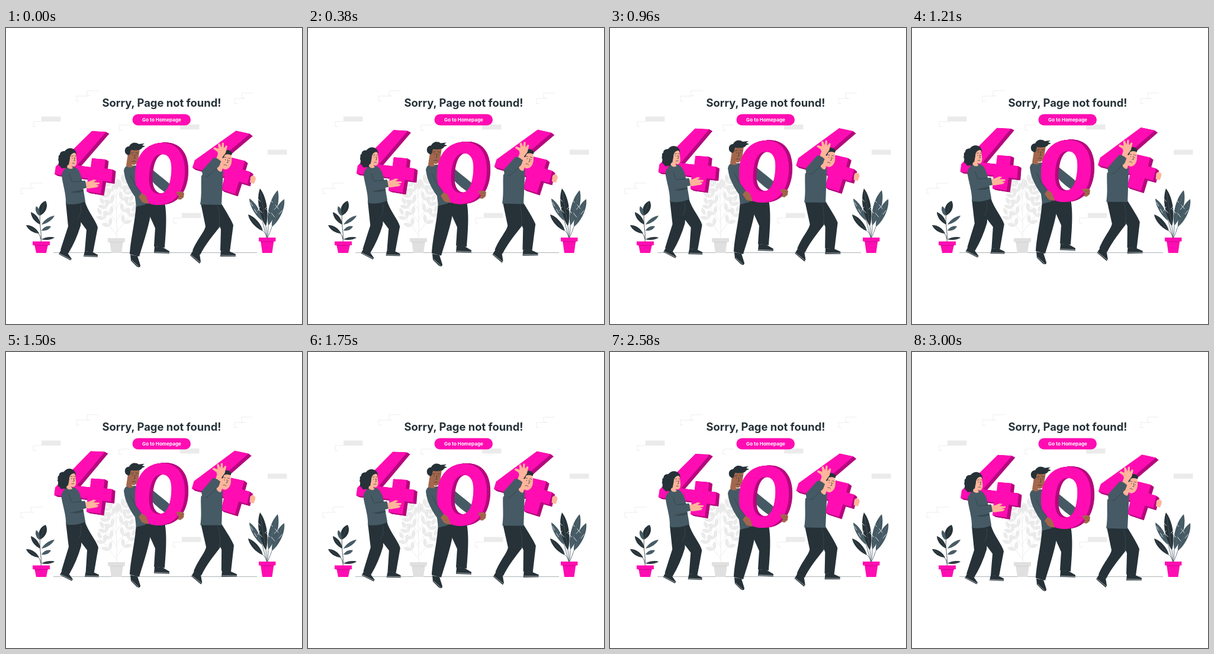
An HTML page that plays this animation: 500x500 px, repeating every 3040 ms.

```html
<!DOCTYPE html>
<html lang="en">
<head>
<meta charset="utf-8">
<title>Page not found</title>
<style>
html, body { margin: 0; width: 100%; height: 100%; overflow: hidden; background: #fff; }
svg { display: block; width: 100%; height: 100%; }
text { font-family: Inter, "Open Sans", sans-serif; font-weight: 700; text-anchor: middle; }
.pink { fill: #ff0db2; }
.side { fill: #b5087e; }
.dark { fill: #263238; }
.grey { fill: #455a64; }
.fold { fill: #37474f; }
.skin { fill: #ffb59b; }
.brown { fill: #a3674c; }
.line { fill: none; stroke: #263238; stroke-width: .7; stroke-linecap: round; }
.seam { fill: none; stroke: #52616a; stroke-width: .4; }
.sole { fill: none; stroke: #fff; stroke-width: .6; }
.brick { fill: #ebebeb; }
.outline { fill: none; stroke: #e6e6e6; stroke-width: .7; }
</style>
</head>
<body>
<svg viewBox="0 0 500 500">
  <defs>
    <path id="four" d="M145 174 169 175.500 120 232 143 235 145 220 168 222 166 237 180 239 178 260 163.500 258 160 280 136 276 138 254 82 247 84 234Z"/>
    <path id="zero" fill-rule="evenodd" d="M264 194C291 194 304 216 302 247C300 280 282 299 257 299C229 299 217 277 218 246C219 214 238 194 264 194ZM263 213C250 213 244 226 242 247C240 268 246 280 258 280C271 280 277 267 279 246C281 225 276 213 263 213Z"/>
    <g id="four3d"></g>
    <g id="zero3d"></g>
  </defs>

  <rect width="500" height="500" fill="#fff"/>
  <g id="bricks"></g>
  <path d="M80 379.500H424" stroke="#8b9398" stroke-width=".7"/>

  <text x="263" y="132.500" font-size="18.400" class="dark">Sorry, Page not found!</text>
  <rect x="213.500" y="145.500" width="98.500" height="19" rx="9.500" class="pink"/>
  <text x="263" y="157.700" font-size="8.100" fill="#fff">Go to Homepage</text>

  <g id="palePlant"></g>
  <g id="leftPlant"></g>
  <g id="rightPlant"></g>

  <g id="woman">
    <path class="skin" d="M165 233C168 229 173 230 173 234L172 239 165 238Z"/>
    <use href="#four3d"/>
    <path class="dark" d="M89 382 93 375 104 380 111 390 109 392.500ZM133 377 145 378 155 383 155 387 131 386Z"/>
    <path class="sole" d="M90 381 110 391M132 384.500 155 385.500"/>
    <path class="dark" d="M101 295 129 295 126 334Q118 360 105 381L92 375Q100 350 105 335Z"/>
    <path class="dark" d="M112 297 133 292C138 310 152 325 155 337L147 379 133 377 136 341 119 318Z"/>
    <path class="seam" d="M126 298C128 310 125 318 121 322"/>
    <path class="grey" d="M105 234 117 235C125 240 128 252 129 262L134 293Q118 300 101 297C102 280 95 262 94 248Q96 239 105 234Z"/>
    <path class="fold" d="M108 277 131 273 131 276Q118 280 108 277Z"/>
    <path class="skin" d="M131 261 141 259 148 256 153 257 148 260.500 158 261 158 263.500 152 264.500 157 266 154 269 140 271 131 270Z"/>
    <path class="grey" d="M95 246C102 238 107 248 110 260L134 258 136 270 110 277C102 276 96 258 95 246Z"/>
    <path class="line" style="stroke-width:.5" d="M107 247C111 256 110 260 113 260L133 258"/>
    <path class="dark" d="M99 208C106 199 118 203 119 212L117 232C112 233 110 237 104 235C101 239 99 235 96 237C92 238 93 233 90 233C87 229 91 226 88 223C90 219 87 216 91 214C91 209 95 208 99 208Z"/>
    <path class="skin" d="M107 210C112 206 118 210 118.500 215L119.500 226C119 234 115 235 111 233L113 237Q107 240 103 235L105 228Z"/>
    <path class="dark" d="M101 207C107 202 117 204 118 211C112 210 108 215 108 221L106 231 100 233Z"/>
    <path class="line" d="M110.500 216.500 113.500 216M116 216 118 216.500M112 219.500V220.500M117 219.500V220.500M115 219 116.500 224 114.500 224.500M112 228.500Q114 227.500 116 228.500"/>
  </g>

  <g id="middleMan">
    <path class="dark" d="M210 383 222 385 227 401C227 405 223 405 220 402L211 393ZM251 369 264 370 276 377 276 381 250 380Z"/>
    <path class="sole" d="M212 392 224 403M251 378.500 276 379.500"/>
    <path class="dark" d="M238 297 267 290C272 310 271 335 268 371L250 369 252 338 243 318Z"/>
    <path class="dark" d="M220 295 247 294C245 322 237 348 225 386L209 382C211 352 218 330 220 295Z"/>
    <path class="grey" d="M204 233 224 232 234 250 236 298 220 302 217 278C209 268 200 252 199 241Q200 235 204 233Z"/>
    <path class="grey" d="M246 238C256 247 270 257 284 270L276 282Q258 272 244 256Z"/>
    <path class="brown" d="M207 206 226 204 223 226C219 233 213 232 211 229L215 234Q207 238 203 232Z"/>
    <path class="dark" d="M202 212C199 206 202 200 208 200C212 192 220 193 224 196L234 195 230 198 235 200 230 202C228 207 219 207 211 206L209 214 206 215Z"/>
    <path class="line" d="M211 211.500 215 210.500M219 210.500 223 211.500M213.500 214V215M220 214V215M217 214 218 220 216 220.500M213 225.500Q216 224 219 225.500"/>
    <use href="#zero3d"/>
    <path class="grey" d="M202 239C208 239 210 249 214 258L230 281 223 291C214 282 201 259 200 246Z"/>
    <path class="line" style="stroke-width:.5" d="M210 249 219 266 230 281"/>
    <path class="brown" d="M224 285 229 279 236 283 239 290 241 297 235 296 230 294Z"/>
    <path class="brown" d="M287 277 297 276 301 279 300 286 295 290 289 289 292 285Z"/>
    <path class="line" style="stroke:#7c4936;stroke-width:.5" d="M292 281 299 280M293 285 299 284"/>
  </g>

  <g id="rightMan">
    <use href="#four3d" transform="translate(243.500 -.5) rotate(9 145 174)"/>
    <path class="skin" d="M413 252C416 247 422 249 422 255L419 263 412 261Z"/>
    <path class="dark" d="M316 376 327 382 329 395 327 398 311 384ZM363 376 377 377 388 382 388 386 362 386Z"/>
    <path class="sole" d="M312 383 328 396M363 384 388 384.500"/>
    <path class="dark" d="M345 298 364 297C373 312 381 325 384 333L378 378 362 376 363 340Z"/>
    <path class="dark" d="M329 296 357 298 361 336C350 350 337 365 328 383L315 376C324 355 335 345 337 335Z"/>
    <path class="seam" d="M358 301C362 317 361 330 359 338"/>
    <path class="grey" d="M338 239 354 234 367 241C366 258 365 280 364 299L328 298C331 280 329 265 330 250Z"/>
    <path class="skin" d="M363 213 379 211C382 218 382 228 379 233C375 240 369 240 366 237L364 243Q358 243 356 236Z"/>
    <path class="dark" d="M368 212 370 207Q377 204 382 211L381 215Q376 212 370 214L367 220 365 219Z"/>
    <path class="line" d="M368 218 372 219M375.500 219.500 379 220.500M370.500 222V223M377 223.500V224.500M374.500 222 375 227.500 373 227.500M368 231Q371 230 373 232.500"/>
    <path class="skin" d="M355 221 358 213 357 209 350 204 352 201.500 359 204 358 196 361 195 364 202 365 194 368 194 368 203 372 198 374 200 371 211 365 219 361 225Z"/>
    <path class="grey" d="M331 241 351 219Q357 219 363 225L360 233 342 250Q331 254 331 241Z"/>
    <path class="line" style="stroke-width:.5" d="M363 225 360 233 342 250 338 251"/>
  </g>
</svg>
<script>
const $ = id => document.getElementById(id);
const LOOP = 3040, RISE = 6.3;

// Solid letters: stacked dark copies behind a bright face.
function extrude(id, dx, dy) {
  let out = '';
  for (let i = 12; i > 0; i--) out += `<use href="#${id}" class="side" x="${dx * i / 12}" y="${dy * i / 12}"/>`;
  $(id + '3d').innerHTML = out + `<use href="#${id}" class="pink"/>`;
}

// Leaf from its base to its tip, bulging by w on both sides.
function leaf(x, y, tx, ty, w, fill, vein) {
  const dx = tx - x, dy = ty - y, len = Math.hypot(dx, dy), nx = -dy / len * w, ny = dx / len * w;
  const side = s => [.3, .75].map(k => `${x + dx * k + nx * s} ${y + dy * k + ny * s}`);
  const [a, b] = side(1), [c, d] = side(-1);
  return `<path fill="${fill}" d="M${x} ${y}C${a} ${b} ${tx} ${ty}C${d} ${c} ${x} ${y}Z"/>`
    + `<path d="M${x} ${y}L${x + dx * .9} ${y + dy * .9}" stroke="${vein}" stroke-width=".4"/>`;
}

const stem = (d, color) => `<path d="${d}" fill="none" stroke="${color}" stroke-width=".8"/>`;

function pot(x, y, w, fill, shade) {
  return `<path fill="${fill}" d="M${x + 3} ${y + 5}H${x + w - 3}L${x + w - 6} 380H${x + 6}Z"/>`
    + `<path fill="${shade}" d="M${x + 3} ${y + 6}H${x + w - 3}L${x + w - 3.3} ${y + 7.5}H${x + 3.3}Z"/>`
    + `<rect x="${x}" y="${y}" width="${w}" height="6.5" fill="${fill}"/>`;
}

function drawBricks() {
  const filled = [[60, 149.5], [294, 163], [442, 205.5], [297, 312.5]];
  const outlined = [[137, 106, 20], [119, 115, 20], [46, 158, 14], [191, 164, 18], [398, 110, 19],
    [386, 119, 18], [283, 321, 14], [42, 262, 20], [25, 271, 17]];
  $('bricks').innerHTML = filled.map(([x, y]) => `<rect x="${x}" y="${y}" width="32.5" height="8.5" class="brick"/>`).join('')
    + outlined.map(([x, y, w]) => `<path class="outline" d="M${x + w} ${y}H${x}V${y + 8.5}H${x + 5}"/>`).join('');
}

function drawPlants() {
  const dark = '#263238', grey = '#455a64', pink = '#ff0db2', shade = '#c90a8c';

  const small = [[57, 317, 67, 292, 8, dark], [56, 317, 51, 301, 4, grey], [60, 332, 82, 317, 4, grey], [58, 332, 42, 311, 5, dark],
    [60, 342, 76, 335, 4, grey], [56, 347, 34, 333, 5, dark], [60, 357, 82, 354, 3, dark]];
  $('leftPlant').innerHTML = stem('M59 362C61 345 55 330 58 312M59 357Q58 350 54 346', dark)
    + small.map(l => leaf(...l, '#60717a')).join('') + pot(45, 360.5, 29, pink, shade);

  const pale = '#e8e8e8';
  let foliage = stem('M187 356C188 320 184 290 187 262', pale) + leaf(187, 274, 189, 254, 5, pale, '#fff');
  for (let i = 0; i < 4; i++) {
    for (const side of [-1, 1]) {
      const y = 350 - i * 21 - (side > 0 ? 5 : 0), reach = 26 - i * 4, rise = 34 - i * 3;
      const at = k => [187 + side * reach * k, y - rise * k];
      const [ex, ey] = at(1);
      foliage += stem(`M187 ${y}L${ex} ${ey}`, pale) + leaf(ex, ey, ex + side * 6, ey - 12, 4, pale, '#fff');
      for (const k of [.45, .8]) {
        const [x, by] = at(k);
        foliage += leaf(x, by, x + side * 14, by - 4, 4, pale, '#fff') + leaf(x, by, x - side * 2, by - 15, 4, pale, '#fff');
      }
    }
  }
  $('palePlant').innerHTML = foliage + pot(172, 355, 29, '#e0e0e0', '#d2d2d2');

  const tall = [[439, 335, 429, 271, 9, dark], [443, 334, 459, 274, 9, grey], [449, 336, 470, 289, 8, grey],
    [433, 326, 411, 288, 6, grey], [434, 343, 409, 315, 6, dark]];
  // White slits give the big leaves their cut edges.
  const slits = tall.slice(0, 4).map(([x, y, tx, ty, w]) => {
    let d = '';
    for (const [k, s] of [[.35, -1], [.45, 1], [.65, -1]]) {
      const px = x + (tx - x) * k, py = y + (ty - y) * k;
      d += `M${px + s * w * .3} ${py}L${px + s * w} ${py - 7}`;
    }
    return stem(d, '#fff');
  }).join('');
  const stalks = tall.map(([x, y]) => stem(`M${x} ${y}Q${(x + 441) / 2 + 1} 345 441 356`, grey)).join('');
  $('rightPlant').innerHTML = stalks + tall.map(l => leaf(...l, '#71828b')).join('') + slits + pot(427, 354, 28.5, pink, shade);
}

// Everyone lifts and lowers at constant speed; the outer two also lean.
function update(now) {
  const lift = 1 - Math.abs(2 * (now % LOOP) / LOOP - 1);
  const pose = (id, x, lean) => $(id).setAttribute('transform',
    `translate(0 ${-RISE * lift}) rotate(${-lean * lift} ${x} 285)`);
  pose('woman', 130, 1.1);
  pose('middleMan', 255, 0);
  pose('rightMan', 365, 1.2);
}

extrude('four', 5.5, 3);
extrude('zero', 6, -.5);
drawBricks();
drawPlants();
const start = performance.now();
function tick() {
  update(performance.now() - start);
  requestAnimationFrame(tick);
}
tick();
</script>
</body>
</html>
```
